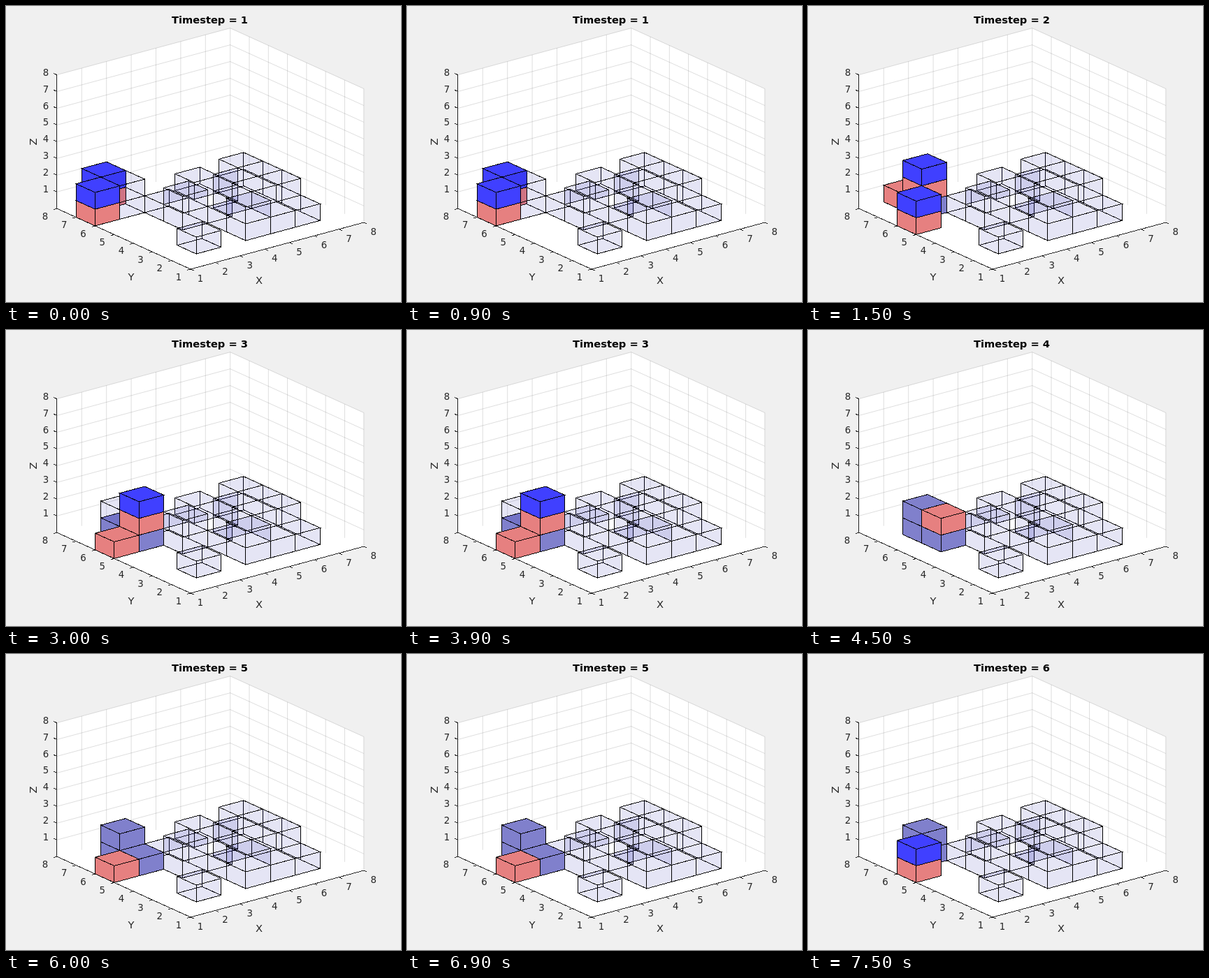
An HTML page that plays this animation: 565 by 424 pixels, repeating every 8000 ms.

```html
<!DOCTYPE html>
<html lang="en">
<head>
<meta charset="utf-8">
<title>Cube steps</title>
<style>
html, body { margin: 0; width: 100%; height: 100%; overflow: hidden; background: #f0f0f0; }
svg { display: block; width: 565px; height: 424px; }
text { font: 13.33px "DejaVu Sans", sans-serif; fill: #262626; text-anchor: middle; }
.label { font-size: 14.67px; }
.title { font-size: 14.67px; font-weight: bold; fill: #000; }
.grid { stroke: #262626; stroke-opacity: .15; fill: none; }
.axis { stroke: #262626; fill: none; shape-rendering: crispEdges; }
.cube { stroke: #000; shape-rendering: crispEdges; }
</style>
</head>
<body>
<svg viewBox="0 0 565 424">
  <g id="axes"></g>
  <g id="cubes" class="cube"></g>
  <text id="title" class="title" x="291.5" y="25"></text>
</svg>
<script>
const STEP = 1500, LOOP = 8000;
const FILL = { b: '#4040ff', r: '#e68080', p: '#8080cc' };
const GHOST = 'fill="#000099" fill-opacity=".1"';
const HIDDEN = 'fill="none"';
const $ = id => document.getElementById(id);

// Cells are written as "xyz" digits.
const ghosts = ('220 420 520 620 430 530 630 640 650 540 631 641 651 541 531 421 ' +
  '340 341 350 560 260 261').split(' ');
const steps = [
  { b: '161 271', r: '160 270' },
  { b: '151 262', r: '150 261 270', p: '260' },
  { b: '252', r: '150 251', p: '250 260' },
  { r: '251', p: '250 260 261' },
  { r: '150', p: '250 260 261' },
  { b: '151', r: '150', p: '260 261' }
];

function project(x, y, z) {
  return [
    264 + 35.4 * (x - 1) - 27.3 * (y - 1),
    377 - 9.55 * (x - 1) - 12.4 * (y - 1) - 23.95 * z
  ];
}
const pts = list => list.map(p => project(...p).map(v => v.toFixed(1)).join()).join(' ');
const poly = (list, attrs) => `<polygon points="${pts(list)}" ${attrs}/>`;
const line = (list, cls) => `<polyline points="${pts(list)}" class="${cls}"/>`;
const text = (x, y, s, attrs = '') => `<text x="${x}" y="${y}" ${attrs}>${s}</text>`;

function tick([x, y], dx, dy, tx, ty, s) {
  return `<path class="axis" d="M${x} ${y}l${dx} ${dy}"/>` + text(x + tx, y + ty, s);
}

function drawAxes() {
  let out = poly([[1, 8, 0], [1, 8, 8], [8, 8, 8], [8, 1, 8], [8, 1, 0], [1, 1, 0]], 'fill="#fff"');
  for (let i = 1; i <= 8; i++) {
    out += line([[i, 8, 0], [i, 8, 8]], 'grid');
    if (i < 8) out += line([[8, i, 0], [8, i, 8]], 'grid');
    out += line([[1, 8, i], [8, 8, i], [8, 1, i]], 'grid');
  }
  out += line([[1, 8, 8], [1, 8, 0], [1, 1, 0], [8, 1, 0]], 'axis');
  for (let i = 1; i <= 8; i++) {
    out += tick(project(i, 1, 0), 4.5, 2, 14, 18, i);
    out += tick(project(1, i, 0), -4.8, 1.3, -17, 15.5, i);
    out += tick(project(1, 8, i), -4.5, -2, -16, 1, i);
  }
  out += text(362, 398, 'X', 'class="label"') + text(179, 393, 'Y', 'class="label"');
  out += text(0, 0, 'Z', 'class="label" transform="translate(44 194.5) rotate(-90)"');
  $('axes').innerHTML = out;
}

// Ghost cells that touch share no inner faces; their back sides show as outlines.
function cube(cell, cells) {
  const [x, y, z] = [...cell].map(Number);
  const X = x + 1, Y = y + 1, Z = z + 1;
  const attrs = cells[cell], ghost = attrs === GHOST;
  const face = (next, list, style) =>
    ghost && cells[next.join('')] === GHOST ? '' : poly(list, style);
  const sideX = (k, next, style) => face(next, [[k, y, z], [k, Y, z], [k, Y, Z], [k, y, Z]], style);
  const sideY = (k, next, style) => face(next, [[x, k, z], [X, k, z], [X, k, Z], [x, k, Z]], style);
  const back = ghost ? sideX(X, [X, y, z], HIDDEN) + sideY(Y, [x, Y, z], HIDDEN) : '';
  return back + sideX(x, [x - 1, y, z], attrs) + sideY(y, [x, y - 1, z], attrs) +
    face([x, y, Z], [[x, y, Z], [X, y, Z], [X, Y, Z], [x, Y, Z]], attrs);
}

// Far cells first: large x, then large y, then low z.
const backToFront = (a, b) => b[0] - a[0] || b[1] - a[1] || a[2] - b[2];

function drawStep(n) {
  const cells = {};
  for (const c of ghosts) cells[c] = GHOST;
  for (const [kind, list] of Object.entries(steps[n]))
    for (const c of list.split(' ')) cells[c] = `fill="${FILL[kind]}"`;
  $('cubes').innerHTML = Object.keys(cells).sort(backToFront).map(c => cube(c, cells)).join('');
  $('title').textContent = `Timestep = ${n + 1}`;
}

let shown = -1;
const start = performance.now();
function frame() {
  const t = (performance.now() - start) % LOOP;
  const n = Math.floor(t / STEP);
  if (n !== shown) drawStep(shown = n);
  requestAnimationFrame(frame);
}
drawAxes();
frame();
</script>
</body>
</html>
```
